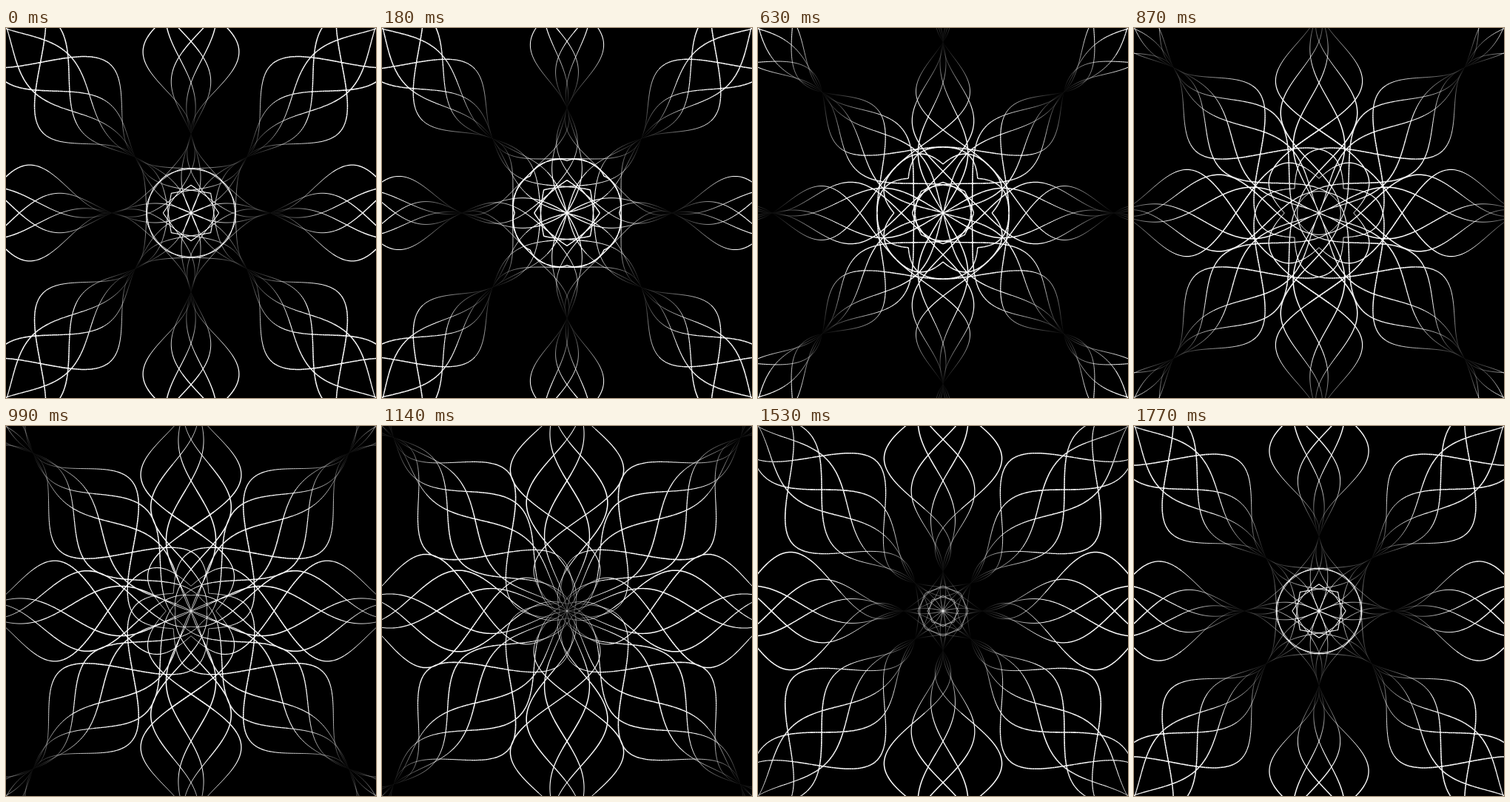
Recreate the animation shown at these times as an HTML page with a canvas. Size 500 px wide and 500 px high, loop 1.8 s.

```html
<!DOCTYPE html>
<html>
<head>
<meta charset="utf-8">
<style>
html, body { margin: 0; width: 100%; height: 100%; overflow: hidden; background: #000; }
canvas { display: block; }
</style>
</head>
<body>
<canvas id="stage" width="500" height="500"></canvas>
<script>
const ctx = document.getElementById('stage').getContext('2d');
const LOOP = 1800, STEP = 30, GAP = 355, START = 106.5, REACH = 364, DX = 2;

// fixed strands of one arm: same wave, each weaker and one radian behind
const strands = [82, 55, 35].map((size, i) => x => size * Math.cos(0.0179 * (x - 200) + i));
const arms = Array.from({ length: 8 }, (_, i) => {
  const a = i * Math.PI / 4;
  return [Math.cos(a), Math.sin(a)];
});

function draw(t) {
  const knot = START + GAP * t / LOOP;
  // travelling envelope, zero at each knot
  const swell = x => Math.sin(Math.PI * (x - knot) / GAP);

  ctx.setTransform(1, 0, 0, 1, 0, 0);
  ctx.fillStyle = '#000';
  ctx.fillRect(0, 0, 500, 500);
  ctx.translate(250, 250);
  ctx.strokeStyle = '#fff';

  for (let x = 0; x < REACH; x += DX) {
    const x2 = x + DX, e1 = swell(x), e2 = swell(x2);
    ctx.lineWidth = 0.02 + 1.55 * Math.abs(swell(x + DX / 2)) ** 1.2;
    ctx.beginPath();
    for (const f of strands) {
      for (const side of [-1, 1]) {
        const y = side * e1 * f(x), y2 = side * e2 * f(x2);
        for (const [c, s] of arms) {
          ctx.moveTo(x * c - y * s, x * s + y * c);
          ctx.lineTo(x2 * c - y2 * s, x2 * s + y2 * c);
        }
      }
    }
    ctx.stroke();
  }
}

const begin = performance.now();
let last = -1;
function tick() {
  const t = Math.floor((performance.now() - begin) % LOOP / STEP) * STEP;
  if (t !== last) draw(last = t);
  requestAnimationFrame(tick);
}
tick();
</script>
</body>
</html>
```
